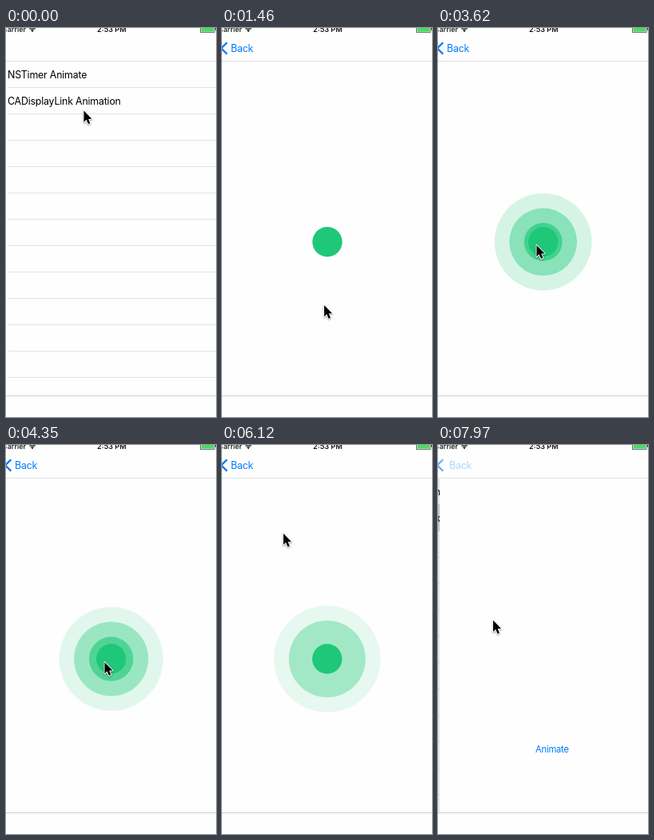
Recreate the animation shown at these times as an HTML page with a canvas. Size 263x487 px, loop 8 s.

```html
<!DOCTYPE html>
<html lang="en">
<head>
<meta charset="utf-8">
<title>Ripple button demo</title>
<style>
  html, body { margin: 0; width: 100%; height: 100%; overflow: hidden; background: #fefefe; }
  canvas { display: block; width: 263px; height: 487px; }
</style>
</head>
<body>
<canvas id="stage"></canvas>
<script>
const W = 263, H = 487, LOOP = 8000;
const NAV = 41, BAR = 460, ROW = 33;   // nav bar line, toolbar line, row height
const LEFT = -9, SCREEN = 281;         // the phone screen is wider than the stage
const PAPER = '#fefefe', BLUE = '#007aff', GREEN = '#1ec878';
const FONT = 'Inter, "Open Sans", Arial, sans-serif';

const canvas = document.getElementById('stage');
const ctx = canvas.getContext('2d');
const dpr = window.devicePixelRatio || 1;
canvas.width = W * dpr;
canvas.height = H * dpr;

// Pointer tip: time, x, y
const PATH = [
  [0, 97.5, 103.5], [60, 97, 104], [200, 94.5, 106], [700, 122, 67], [1020, 122, 67],
  [1400, 129, 350], [1460, 128, 347], [1700, 123.5, 272], [5650, 123.5, 272],
  [6120, 77, 111], [6430, 13, 16], [6600, 12, 16], [6800, 20.5, 29], [7060, 20.5, 29],
  [7480, 60, 88], [7730, 60, 88], [7970, 69, 219], [8000, 70, 232]
];

// Start time of each ripple
const RIPPLES = [2265, 2860, 3455, 4062, 4578, 5178];

const clamp = v => Math.max(0, Math.min(1, v));

// Critically damped spring from 0 to 1
function spring(ms) {
  const k = Math.max(0, ms) / 50;
  return 1 - (1 + k) * Math.exp(-k);
}

function slope(i, c) {
  return (PATH[i + 1][c] - PATH[i][c]) / (PATH[i + 1][0] - PATH[i][0]);
}

function tangent(i, c) {
  if (i === 0 || i === PATH.length - 1) return 0;
  const a = slope(i - 1, c), b = slope(i, c);
  return a * b > 0 ? 2 * a * b / (a + b) : 0;
}

// Monotone cubic through the path
function along(t, c) {
  let i = 0;
  while (i < PATH.length - 2 && t >= PATH[i + 1][0]) i++;
  const d = PATH[i + 1][0] - PATH[i][0];
  const u = clamp((t - PATH[i][0]) / d), v = 1 - u;
  return PATH[i][c] * (1 + 2 * u) * v * v + PATH[i + 1][c] * u * u * (3 - 2 * u)
    + d * (tangent(i, c) * u * v * v - tangent(i + 1, c) * u * u * v);
}

function text(str, x, y, size, color, weight = 400, align = 'left', spacing = -0.2) {
  ctx.font = `${weight} ${size}px ${FONT}`;
  ctx.letterSpacing = spacing + 'px';
  ctx.textAlign = align;
  ctx.fillStyle = color;
  ctx.fillText(str, x, y);
}

function rect(x, y, w, h, color) {
  ctx.fillStyle = color;
  ctx.fillRect(x, y, w, h);
}

function disc(x, y, r, color, alpha = 1) {
  ctx.globalAlpha = alpha;
  ctx.fillStyle = color;
  ctx.beginPath();
  ctx.arc(x, y, r, 0, Math.PI * 2);
  ctx.fill();
  ctx.globalAlpha = 1;
}

function drawList(shift, dim, picked, tint) {
  ctx.save();
  ctx.translate(shift, 0);
  for (let y = NAV + ROW; y < BAR; y += ROW) rect(2.5, y, SCREEN, 1, '#e3e3e5');
  if (picked >= 0) {
    ctx.globalAlpha = tint;
    rect(LEFT, NAV + ROW * picked, SCREEN, ROW + 1, '#d9d9d9');
    ctx.globalAlpha = 1;
  }
  text('NSTimer Animate', 2, 62.5, 12.4, '#000');
  text('CADisplayLink Animation', 2, 95.5, 12.4, '#000');
  ctx.restore();
  if (dim > 0) rect(0, NAV, W, BAR - NAV, `rgba(0,0,0,${0.1 * dim})`);
}

function drawRipples(t) {
  const x = 131.7, y = 267.8, r0 = 18.7;
  for (const start of RIPPLES) {
    const r = r0 + (t - start) * 0.0311;
    if (r > r0 && r < 75) disc(x, y, r, GREEN, (75 - r) * 0.0127);
  }
  disc(x, y, r0, GREEN);
}

function drawDetail(shift, t, second) {
  ctx.save();
  ctx.translate(shift, 0);
  rect(LEFT, NAV, SCREEN, BAR - NAV, PAPER);
  if (second) text('Animate', 131.7, 385.3, 11.2, BLUE, 400, 'center');
  else drawRipples(t);
  ctx.restore();
}

function drawBack(x, textAlpha, arrowAlpha) {
  ctx.globalAlpha = arrowAlpha;
  ctx.strokeStyle = BLUE;
  ctx.lineWidth = 2.2;
  ctx.beginPath();
  ctx.moveTo(6.3, 18.2);
  ctx.lineTo(-1, 25.4);
  ctx.lineTo(6.3, 32.6);
  ctx.stroke();
  ctx.globalAlpha = textAlpha;
  text('Back', x, 30, 12.4, BLUE);
  ctx.globalAlpha = 1;
}

function drawStatus() {
  text('Carrier', 25, 4.7, 9, '#111', 500, 'right', 0);
  text('2:53 PM', 132.3, 4.7, 9.1, '#111', 600, 'center', 0);
  ctx.strokeStyle = '#111';
  ctx.lineWidth = 1.2;
  for (const r of [2.6, 4.8]) {
    ctx.beginPath();
    ctx.arc(33, 4.6, r, -Math.PI * 0.76, -Math.PI * 0.24);
    ctx.stroke();
  }
  disc(33, 3.9, 1, '#111');
  ctx.lineWidth = 0.7;
  ctx.strokeStyle = '#333';
  ctx.strokeRect(243.6, -3, 17.6, 8.3);
  rect(244.4, -2, 16, 6.6, '#4cd964');
  rect(262, 0, 1, 2.5, '#333');
}

function drawPointer(x, y) {
  ctx.save();
  ctx.translate(x, y);
  ctx.beginPath();
  [[0, 0], [0, 14.3], [3.2, 11.3], [5.5, 16.8], [7.9, 15.8], [5.7, 10.5], [10, 10.3]]
    .forEach(p => ctx.lineTo(p[0], p[1]));
  ctx.closePath();
  ctx.lineJoin = 'round';
  ctx.shadowColor = 'rgba(0,0,0,0.4)';
  ctx.shadowBlur = 2 * dpr;
  ctx.shadowOffsetY = dpr;
  ctx.strokeStyle = '#fff';
  ctx.lineWidth = 1.8;
  ctx.stroke();
  ctx.shadowColor = 'transparent';
  ctx.fillStyle = '#000';
  ctx.fill();
  ctx.restore();
}

// Which screen shows: open 0 is the list, 1 the detail
function navState(t) {
  const push = (tap, row) => {
    const ms = t - tap - 40;
    return { open: spring(ms), row, tint: 1,
      label: clamp((ms - 150) / 330), arrow: clamp(ms / 420) };
  };
  if (t < 940) return { open: 0, row: -1, tint: 0, label: 0, arrow: 0 };
  if (t < 6980) return push(940, 0);
  if (t < 7680) {
    const p = spring(t - 7040);
    return { open: 1 - p, row: 0, tint: 1 - p,
      label: 1 - clamp((t - 7040) / 220), arrow: 0.25 * (1 - clamp((t - 7040) / 150)) };
  }
  return push(7680, 1);
}

function draw(t) {
  ctx.setTransform(dpr, 0, 0, dpr, 0, 0);
  rect(0, 0, W, H, PAPER);
  const s = navState(t);
  const gap = 1 - s.open;
  if (gap > 0.0005) drawList(-0.3 * SCREEN * s.open, s.open, s.row, s.tint);
  if (s.open > 0) drawDetail(gap * SCREEN, t, t >= 7680);
  rect(0, 0, W, NAV, PAPER);
  rect(0, BAR, W, H - BAR, PAPER);
  rect(0, NAV, W, 1, '#dedee0');
  rect(0, BAR, W, 1, '#cfcfd1');
  drawStatus();
  drawBack(11 + 75 * gap, s.label, s.arrow);
  drawPointer(along(t, 1), along(t, 2));
}

const begin = performance.now();
function frame() {
  draw((performance.now() - begin) % LOOP);
  requestAnimationFrame(frame);
}
frame();
</script>
</body>
</html>
```
